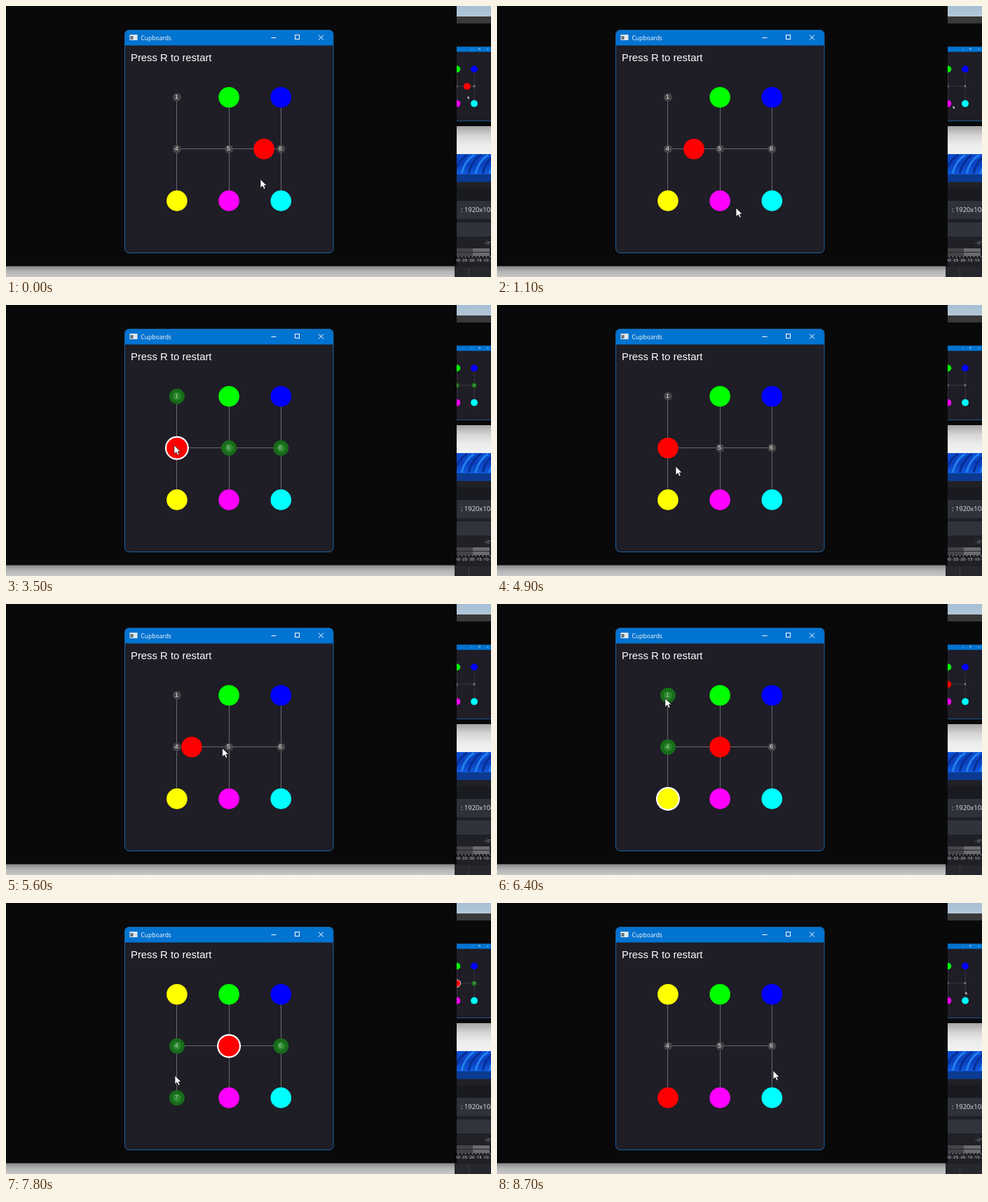
Animation of 692x388 px, one loop 8.8 s. Source, as an HTML page with a canvas:

```html
<!DOCTYPE html>
<html lang="en">
<head>
<meta charset="utf-8">
<title>Cupboards</title>
<style>
  html, body { margin: 0; width: 100%; height: 100%; overflow: hidden; background: #090909; }
  canvas { display: block; }
</style>
</head>
<body>
<canvas id="stage" width="692" height="388"></canvas>
<script>
const ctx = document.getElementById('stage').getContext('2d');
const LOOP = 8800, STEP = 100, SPEED = 0.21, LAG = 30; // ms, speed in px per ms
const SANS = '"Liberation Sans", Arial, sans-serif';
const UI = '"Open Sans", "Noto Sans", sans-serif';
const ARROW = new Path2D('M0 0V12.5L3 9.8L5.2 14.2L7.2 13.2L5.2 9H9Z');

// Board nodes 1..9, row by row
const NODES = [1, 2, 3, 4, 5, 6, 7, 8, 9];
const node = n => [243.9 + (n - 1) % 3 * 74.2, 130.7 + Math.floor((n - 1) / 3) * 74.1];

// Columns are linked throughout, rows only in the middle
const linked = (a, b) => Math.abs(a - b) === 3 ||
  Math.abs(a - b) === 1 && Math.min(a, b) > 3 && Math.max(a, b) < 7;

const makePiece = (at, color) => ({ at, color, moves: [{ start: -LOOP, path: [at] }] });
const pieces = [
  makePiece(2, '#00ff00'), makePiece(3, '#0000ff'), makePiece(8, '#ff00ff'),
  makePiece(9, '#00ffff'), makePiece(7, '#ffff00'), makePiece(5, '#ff0000')
];

// Pointer stops: [time, node] clicks a node, [time, x, y] only hovers
const stops = [
  [-600, 5], [-238, 6], [0, 363, 248], [250, 6], [570, 4], [1100, 341, 289], [2050, 341, 289],
  [2800, 4], [3750, 4], [4150, 7], [4450, 7], [4900, 255, 231], [5150, 4], [5500, 5],
  [6100, 7], [6450, 1], [7250, 5], [7800, 241, 247], [7950, 7], [8700, 394, 240]
];
const isClick = stop => stop.length === 2;

// Shortest path to every free node that can be reached
function routesFrom(start) {
  const routes = {}, queue = [[start]];
  for (const path of queue) {
    for (const n of NODES) {
      if (routes[n] || !linked(path.at(-1), n) || pieces.some(p => p.at === n)) continue;
      routes[n] = [...path, n];
      queue.push(routes[n]);
    }
  }
  return routes;
}

// Play the clicks once; each pick is the selection from its time on
const picks = [{ time: -LOOP, routes: {} }];
for (const [time, n] of stops.filter(isClick)) {
  const { piece, routes } = picks.at(-1);
  const hit = pieces.find(p => p.at === n);
  const pick = { time, routes: {} };
  if (hit && hit !== piece) {
    pick.piece = hit;
    pick.routes = routesFrom(n);
  } else if (routes[n]) {
    piece.moves.push({ start: time, path: routes[n] });
    piece.at = n;
  }
  picks.push(pick);
}

const mix = (a, b, k) => a.map((v, i) => v + (b[i] - v) * k);
const ease = u => u * u * (3 - 2 * u);

function stopPoint(stop) {
  if (!isClick(stop)) return stop.slice(1);
  const [x, y] = node(stop[1]);
  return [x - 4, y - 4];
}

function pointerAt(t) {
  const i = stops.findIndex(s => s[0] >= t);
  const a = stops[i - 1], b = stops[i];
  return mix(stopPoint(a), stopPoint(b), ease((t - a[0]) / (b[0] - a[0])));
}

function pieceAt(piece, t) {
  const { start, path } = piece.moves.findLast(m => m.start <= t);
  let left = (t - start) * SPEED, at = node(path[0]);
  for (const to of path.slice(1).map(node)) {
    const len = Math.hypot(to[0] - at[0], to[1] - at[1]);
    if (left < len) return mix(at, to, left / len);
    left -= len;
    at = to;
  }
  return at;
}

function box(x, y, w, h, fill) {
  ctx.fillStyle = fill;
  ctx.fillRect(x, y, w, h);
}

function fade(x, y, w, h, ...colors) {
  const g = ctx.createLinearGradient(0, y, 0, y + h);
  colors.forEach((c, i) => g.addColorStop(i / (colors.length - 1), c));
  box(x, y, w, h, g);
}

function disc([x, y], r, fill) {
  ctx.fillStyle = fill;
  ctx.beginPath();
  ctx.arc(x, y, r, 0, 7);
  ctx.fill();
}

function text(s, x, y, font, fill = '#fff', align = 'left') {
  ctx.font = font;
  ctx.fillStyle = fill;
  ctx.textAlign = align;
  ctx.fillText(s, x, y);
}

function line(color, x0, y0, x1, y1) {
  ctx.strokeStyle = color;
  ctx.lineWidth = 1;
  ctx.beginPath();
  ctx.moveTo(x0, y0);
  ctx.lineTo(x1, y1);
  ctx.stroke();
}

function drawWindow() {
  ctx.save();
  ctx.beginPath();
  ctx.roundRect(169.5, 34.5, 297.5, 319, 6);
  ctx.clip();
  box(169, 34, 299, 320, '#1f1d26');
  box(169, 34, 299, 22.5, '#0173d0');
  ctx.restore();
  ctx.strokeStyle = '#1b62a6';
  ctx.lineWidth = 1;
  ctx.stroke();

  box(176.5, 41, 11, 8, '#dfe8ee');
  box(177.5, 43, 4, 5, '#64727c');
  text('Cupboards', 192.5, 48.7, '8.5px ' + UI);
  line('#fff', 378.5, 45.5, 385.5, 45.5);
  line('#fff', 446, 41.5, 453, 48.5);
  line('#fff', 453, 41.5, 446, 48.5);
  ctx.strokeRect(412.5, 41.5, 6, 6);
  text('Press R to restart', 178, 79, '14.85px ' + SANS);
}

function drawBoard(t) {
  const pick = picks.findLast(p => p.time <= t);
  const snap = v => Math.floor(v) + .5;
  for (const a of NODES) {
    for (const b of NODES) {
      if (a < b && linked(a, b)) line('#6a696f', ...node(a).map(snap), ...node(b).map(snap));
    }
  }
  for (const n of NODES) {
    const at = node(n), free = pick.routes[n];
    if (free) disc(at, 11, '#176b19');
    disc(at, 6, free ? '#2c862e' : '#464548');
    text(n, at[0] - .7, at[1] + 2.4, '9px ' + SANS, free ? '#b4d8b4' : '#f0f0f0', 'center');
  }
  for (const p of pieces) {
    const at = pieceAt(p, t);
    if (pick.piece === p) disc(at, 17, '#fff');
    disc(at, 14.8, p.color);
  }
}

function drawPointer([x, y]) {
  ctx.save();
  ctx.translate(x, y);
  ctx.fillStyle = '#fff';
  ctx.fill(ARROW);
  ctx.strokeStyle = '#111';
  ctx.lineWidth = .7;
  ctx.stroke(ARROW);
  ctx.restore();
}

function drawDesk(t) {
  box(0, 0, 643, 372.5, '#090909');
  drawWindow();
  drawBoard(t);
  drawPointer(pointerAt(t));
}

// Live preview of the desk at a third of its size
function drawPreview(x, w, t) {
  ctx.save();
  ctx.beginPath();
  ctx.rect(x, 25, w, 147);
  ctx.clip();
  box(x, 25, w, 147, '#090909');
  ctx.translate(537.3, 46.8);
  ctx.scale(1 / 3, 1 / 3);
  drawDesk(t);
  ctx.restore();
  box(x, 164, w, 1, '#1b558c');
}

function drawSide(t) {
  const x = 643, w = 49;
  fade(x, 0, w, 15, '#a5bfd6', '#b4c8d8');
  box(x, 15, w, 10, '#39393a');
  drawPreview(x, w, t - LAG);

  // Wallpaper
  fade(x, 172, w, 40, '#a5a3a4', '#d6d4d5', '#ececed', '#f2f2f3');
  fade(x, 212, w, 29, '#0c4fd2', '#0a3fbd', '#0f5bdc');
  ctx.lineWidth = 3;
  for (let i = 0; i < 6; i++) {
    const left = 640 + i * 10;
    ctx.strokeStyle = i % 2 ? '#2380ee' : '#082f94';
    ctx.beginPath();
    ctx.moveTo(left, 240);
    ctx.quadraticCurveTo(left + 4, 222, left + 18, 213);
    ctx.stroke();
  }
  box(x, 241, w, 11, '#0b3a90');

  // Recorder panel
  box(640, 252, 52, 136, '#1f2126');
  box(x, 261, w, 18, '#191b20');
  box(x, 279, w, 26, '#2f323b');
  text(': 1920x108', 649, 295, '9.4px ' + UI, '#e6e6e8');
  box(x, 310, w, 20, '#30333c');
  text('-in', 682, 342, '9.5px ' + UI, '#85878c');
  box(x, 347, 23, 11, '#424448');
  box(666, 347, 24, 11, '#6a6b6e');
  box(x, 352, w, 1, '#222428');
  for (let i = 0; i < 10; i++) box(645 + i * 5, 358, 1, 2, '#8b8d92');
  text('30 -25 -20 -15 -10 -5', 641, 366, '6.2px Roboto, sans-serif', '#d5d6d8');
  box(640, 374, 52, 14, '#26282d');
  box(660, 375, 1, 13, '#3c3f46');
}

function frame(now) {
  const t = Math.floor(now % LOOP / STEP) * STEP;
  fade(0, 372, 640, 16, '#848484', '#b4b4b4', '#c6c6c6');
  drawSide(t);
  drawDesk(t);
  requestAnimationFrame(frame);
}
requestAnimationFrame(frame);
</script>
</body>
</html>
```
